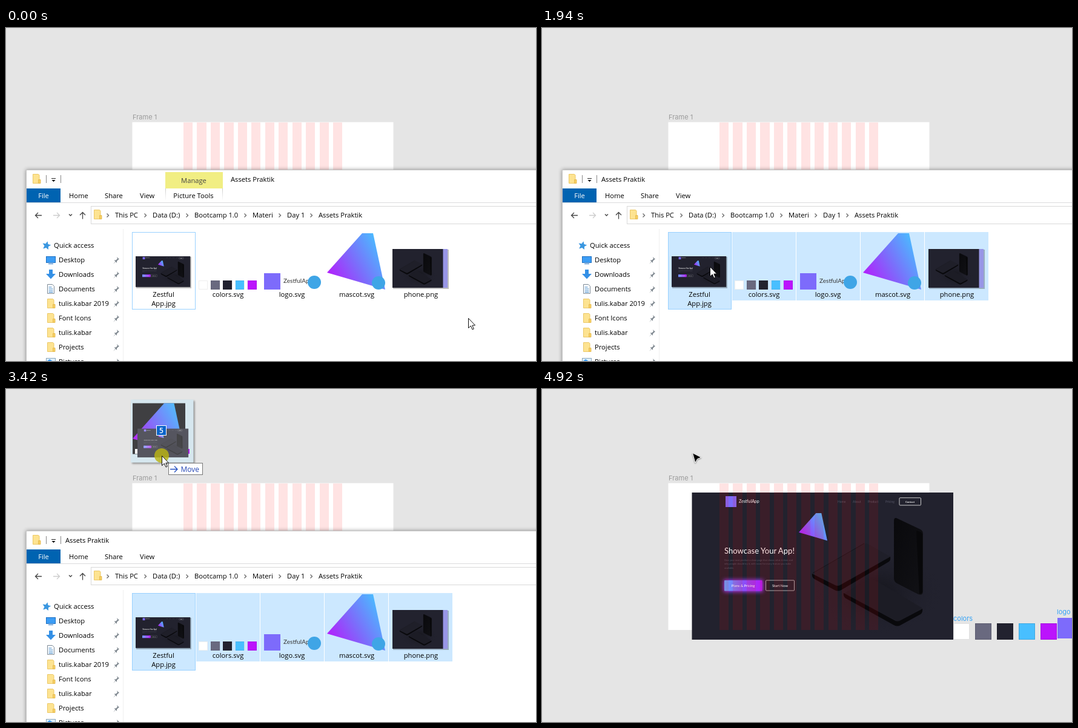
Recreate the animation shown at these times as an HTML page. Size 875x550 px, loop 6240 ms.

```html
<!DOCTYPE html>
<html lang="en">
<head>
<meta charset="utf-8">
<title>Dragging assets into a canvas</title>
<style>
  html, body { margin: 0; width: 100%; height: 100%; overflow: hidden; background: #e5e5e5; }
  svg { display: block; width: 875px; height: 550px; }
  .ui { font: 11.2px "Open Sans", "Noto Sans", sans-serif; fill: #000; }
  .canvas { font: 11px Inter, sans-serif; }
  .page { font: 7px Lato, sans-serif; fill: #fff; }
  .mid { text-anchor: middle; }
  .crisp { shape-rendering: crispEdges; }
  .line { fill: none; stroke: #444; stroke-width: 1.3; }
  #panel { filter: drop-shadow(0 0 3px rgba(0, 0, 0, .4)); }
  #ghostBox { filter: drop-shadow(2px 2px 1.5px rgba(0, 0, 0, .4)); }
  #glow { filter: blur(3px); }
  #pen { filter: drop-shadow(0 1px 1px rgba(0, 0, 0, .45)); }
</style>
</head>
<body>
<svg viewBox="0 0 875 550" xmlns="http://www.w3.org/2000/svg">
  <defs>
    <linearGradient id="tone" x1="0" y1=".85" x2="1" y2=".3">
      <stop offset="0" stop-color="#bb14fc"/><stop offset=".5" stop-color="#7d6bfb"/><stop offset="1" stop-color="#48bfff"/>
    </linearGradient>
    <linearGradient id="cta"><stop offset="0" stop-color="#66a6ff"/><stop offset=".5" stop-color="#8a52f8"/><stop offset="1" stop-color="#b41bf8"/></linearGradient>
    <linearGradient id="edge" x1="0" y1="0" x2="0" y2="1"><stop offset="0" stop-color="#c8c8c8"/><stop offset="1" stop-color="#fff"/></linearGradient>
    <linearGradient id="slab" x1="0" y1="0" x2="1" y2="1"><stop offset="0" stop-color="#09090c"/><stop offset="1" stop-color="#111115"/></linearGradient>
    <radialGradient id="shade"><stop offset="0" stop-color="#15151c"/><stop offset="1" stop-color="#22222e" stop-opacity="0"/></radialGradient>

    <g id="folder">
      <path d="M.5 .5h9l1.500 1.500v13.500h-10.500z" fill="#fde391" stroke="#ecc867"/>
      <path d="M9.500 9.500h3.500v6h-3.500z" fill="#f7cf63" stroke="#e2b548" stroke-width=".8"/>
    </g>
    <path id="pin" d="M4-5l4 4-1.500.5-2.500 2.500v3l-2-2-4 4 3.500-4.500-2-2h3l2.500-2.500z" fill="#7d868e"/>
    <path id="chev" d="M-1.500-3l3 3-3 3" class="line" style="stroke:#666"/>
    <polygon id="mascot" points="588,339 606,339 626,432 530,404" fill="url(#tone)"/>
    <g id="swatches" class="crisp"></g>

    <g id="phones">
      <ellipse cx="555" cy="335" rx="110" ry="72" fill="url(#shade)"/>
      <path d="M447 304L530 256q4-2 8 0L575 277L489 326z" fill="#1f1f29"/>
      <path d="M447 304L532 255" stroke="#15151b" fill="none"/>
      <path d="M446 305q-1 6 4 9l33 18q6 3 11 0L573 285q3-2 2-8L492 324q-4 2-8 0z" fill="#09090c"/>
      <path d="M498 338l46-26 84 50-40 22z" fill="#1c1c25"/>
      <path d="M498 337q-1 6 4 9l79 44q6 3 11 0l33-18q4-3 3-9l-36 19q-5 3-10 0z" fill="#09090c"/>
      <path d="M581 218q0-7 6-4l38 18q4 2 4 7v95q0 8-8 5l-35-18q-5-3-5-8z" fill="url(#slab)"/>
      <path d="M618 234l7 2q3 2 3 6v92q0 5-5 4z" fill="#08080a"/>
    </g>

    <g id="landing" class="page">
      <rect x="247.500" y="171" width="431.500" height="243" fill="#22222e"/>
      <use href="#phones"/>
      <rect x="303" y="177" width="18" height="18" fill="#7d6bfb"/>
      <text x="325" y="187.500">ZestfulApp</text>
      <g id="nav" fill="#555565" font-size="5"></g>
      <rect x="590" y="179.700" width="35.500" height="12.300" rx="1.200" fill="none" stroke="#ddd" stroke-width=".9"/>
      <text x="607.500" y="187.600" class="mid" font-size="4.300" font-weight="700">Contact</text>
      <use href="#mascot" transform="translate(164.300 38.900) scale(.49)"/>
      <text x="301" y="272" font-size="13.100">Showcase Your App!</text>
      <g id="blurb" fill="#575766" font-size="4"></g>
      <rect id="glow" x="300" y="315" width="65" height="20" fill="#9b3cff"/>
      <rect x="301" y="316" width="62.500" height="17.500" rx="1" fill="url(#cta)"/>
      <text x="332" y="326.700" class="mid" font-size="5.900">Plans &amp; Pricing</text>
      <rect x="369.500" y="316" width="47" height="17" rx="1" fill="none" stroke="#ccc" stroke-width=".8"/>
      <text x="393" y="326.700" class="mid" font-size="5.900">Start Now</text>
    </g>
  </defs>

  <rect width="875" height="550" fill="#e5e5e5"/>
  <text class="canvas" x="209" y="151" fill="#9b9b9b">Frame 1</text>
  <rect x="208.500" y="155.500" width="431" height="242.500" fill="#fff"/>
  <use id="dropPage" href="#landing"/>
  <g id="grid" class="crisp" fill="#f00" fill-opacity=".11"></g>
  <g id="dropColors">
    <text class="canvas" x="679" y="383" fill="#36a3f5">colors</text>
    <use href="#swatches" transform="translate(679 387)"/>
  </g>
  <g id="dropLogo">
    <text class="canvas" x="850" y="372" fill="#36a3f5">logo</text>
    <rect x="851" y="378" width="34" height="34" fill="#7d6bfb"/>
  </g>

  <g id="explorer" class="ui">
    <rect id="panel" x="33" y="234" width="900" height="400" fill="#fff"/>
    <path class="crisp" d="M33.500 640V234.500H880" fill="none" stroke="#c4c4c4"/>
    <use href="#folder" x="44" y="241"/>
    <path class="crisp" d="M66.500 243v13M90.500 243v13" stroke="#888"/>
    <path d="M75 248.500h7" stroke="#222"/><path d="M75.500 251h6l-3 3z"/>
    <g id="manage">
      <rect x="263" y="238" width="95" height="27" fill="#f1ee83"/>
      <rect x="263" y="265" width="1" height="20" fill="url(#edge)"/>
      <rect x="357" y="265" width="1" height="20" fill="url(#edge)"/>
      <text x="310" y="256" class="mid" fill="#444">Manage</text>
      <text x="309.500" y="281" class="mid">Picture Tools</text>
    </g>
    <text id="title" y="254">Assets Praktik</text>
    <rect x="34" y="265" width="56" height="23" fill="#0063b1"/>
    <text x="62" y="281" class="mid" fill="#fff">File</text>
    <text x="104" y="281">Home</text><text x="163" y="281">Share</text><text x="221" y="281">View</text>
    <path class="crisp" d="M34 288.500h841" stroke="#dadbdc"/>
    <path class="line" d="M59 309.500H48.500M53 305l-4.500 4.500 4.500 4.500" stroke-width="1.500"/>
    <path class="line" d="M78 309.500h10.500M84 305l4.500 4.500-4.500 4.500" style="stroke:#ccc"/>
    <path class="line" d="M104 307.500l2.500 2.500 2.500-2.500"/>
    <path class="line" d="M126.500 315.500V304.500M122 309l4.500-4.500 4.500 4.500" stroke-width="1.500"/>
    <path class="crisp" d="M880 294.500H140.500v29H880" fill="none" stroke="#d9d9d9"/>
    <use href="#folder" x="145" y="300"/>
    <g id="hot" class="crisp"><rect x="403.500" y="295.500" width="56" height="27" fill="#e5f3ff" stroke="#cce8ff"/><path d="M446.500 296v26" stroke="#cce8ff"/></g>
    <g id="crumbs"></g>
    <path class="crisp" d="M193.500 332V550" stroke="#f0f0f0"/>
    <path d="M67 352l2 4.500 5 .5-3.700 3.300 1 5L67 363l-4.500 2.500 1.200-5L60 357l5-.5z" fill="#3a97e0" transform="rotate(12 67 359)"/>
    <text x="79" y="363">Quick access</text>
    <rect x="66.500" y="377.500" width="15" height="10" fill="#3c9df5" stroke="#1f6fc0"/><path d="M70 389.500h8" stroke="#1f6fc0"/>
    <path d="M71 399h6v7h5l-8 8.500-8-8.500h5z" fill="#3490e6"/>
    <path d="M68.500 423.500h8l3 3v12h-11z" fill="#fff" stroke="#7d8a96"/><path d="M70.500 428h5M70.500 431h7M70.500 434h7M70.500 436.500h7" stroke="#3c86c8"/>
    <rect x="66.500" y="545.500" width="15" height="12" fill="#dff0fd" stroke="#8ba6bb"/><path d="M68 550l4-3 9 6H68z" fill="#3c9df5"/>
    <g id="side"></g>

    <g id="cells" class="crisp"></g>
    <rect class="crisp" x="208.500" y="337.500" width="104" height="127" fill="none" stroke="#99d1ff"/>
    <rect x="215" y="378" width="91" height="52" fill="#000" opacity=".25"/>
    <use href="#landing" transform="translate(162.300 341.300) scale(.209)"/>
    <use href="#swatches" transform="translate(318 417) scale(.56)"/>
    <rect x="426" y="405" width="27" height="27" fill="#7d6bfb"/>
    <text x="458" y="421" style="font:10px Lato,sans-serif" fill="#333">ZestfulApp</text>
    <use href="#mascot"/>
    <circle cx="509" cy="420" r="11" fill="#3fa5e6"/><circle cx="615" cy="421" r="11" fill="#3fa5e6"/>
    <rect x="639" y="366" width="92" height="65" fill="#000" opacity=".25"/>
    <rect x="638" y="365" width="91" height="64" fill="#22222e"/>
    <rect x="721.500" y="365" width="7.500" height="64" fill="#9896e6"/>
    <use href="#phones" transform="translate(520.400 310.200) scale(.29)"/>
    <g id="names" class="mid"></g>
  </g>

  <rect id="band" fill="#0078d7" fill-opacity=".34" stroke="#0078d7" class="crisp"/>
  <g id="pointer">
    <g id="ghost">
      <rect id="ghostBox" x="-51" y="-92.500" width="103.500" height="104" rx="1" fill="#d6e8f0"/>
      <rect x="-48" y="-86.500" width="87" height="84" fill="#37373a"/>
      <use href="#mascot" transform="translate(-525 -391.600) scale(.9)"/>
      <rect x="-44" y="-11" width="5" height="8" fill="#fff"/><rect x="38" y="-11" width="8" height="8" fill="#bb14fc"/>
      <use href="#landing" transform="translate(-88.300 -77.800) scale(.195)"/>
      <rect x="-40" y="-44.500" width="84" height="47.500" fill="#fff" opacity=".2"/>
    </g>
    <g id="badge"><rect x="-8.500" y="-49.500" width="16" height="16" fill="#0a63c9" stroke="#fff"/><text class="ui mid" x="-.5" y="-37" style="fill:#fff;font-weight:600;font-size:12px">5</text></g>
    <circle id="press" r="12" fill="#bbb414" fill-opacity=".82"/>
    <polygon id="arrow" points=".5,.5 .5,16.500 4.300,13 7,19 9.300,18 6.800,12.200 11.500,12" fill="#fff" stroke="#111"/>
    <g id="tip">
      <rect class="crisp" x="11.500" y="12.500" width="56" height="19" fill="#fff" stroke="#777"/>
      <path d="M14 22.500h12M21 17.500l5 5-5 5" fill="none" stroke="#2450c0" stroke-width="1.300"/>
      <text class="ui" x="31.500" y="26.500" style="fill:#2546b4;font-size:12px">Move</text>
    </g>
    <path id="pen" d="M.5 .5L15 8l-6.500 2.500L5 17z" fill="#000" stroke="#fff"/>
  </g>
</svg>

<script>
const LOOP = 6240;
const $ = id => document.getElementById(id);
const fill = (id, list, make) => { $(id).innerHTML = list.map(make).join(""); };
const text = (x, y, s) => `<text x="${x}" y="${y}">${s}</text>`;

fill("grid", [...Array(12).keys()], i =>
  `<rect x="${293 + i * 22.45}" y="155.5" width="15.2" height="242.5"/>`);
fill("swatches", ["#fff", "#69697f", "#22222f", "#48bfff", "#bb14fc"], (c, i) =>
  `<rect x="${i * 36.1}" width="26.5" height="26.5" fill="${c}" stroke="#000" stroke-opacity=".12"/>`);
fill("nav", [["Home", 488], ["About", 513], ["Product", 538], ["Pricing", 567]], ([s, x]) => text(x, 187.5, s));
fill("blurb", [
  "Give your next product a clean page that shows what it does and",
  "why people should try it, with room for every feature you make",
  "available."
], (s, i) => text(301, 283.5 + i * 6.7, s));
fill("crumbs", [["This PC", 180], ["Data (D:)", 242], ["Bootcamp 1.0", 311], ["Materi", 407], ["Day 1", 464], ["Assets Praktik", 516]],
  ([s, x]) => `<use href="#chev" x="${x - 12}" y="309.5"/>` + text(x, 313, s));
fill("side", ["Desktop", "Downloads", "Documents", "tulis.kabar 2019", "Font Icons", "tulis.kabar", "Projects", "Pictures"], (s, i) => {
  const y = 387 + i * 24;
  return text(87, y, s) + `<use href="#pin" x="179" y="${y - 4}"/>` +
    (i > 2 && i < 7 ? `<use href="#folder" x="68" y="${y - 12}"/>` : "");
});
fill("names", [["Zestful", 260, 444], ["App.jpg", 260, 459], ["colors.svg", 366.5, 444], ["logo.svg", 472, 444], ["mascot.svg", 579, 444], ["phone.png", 685, 444]],
  ([s, x, y]) => text(x, y, s));

const cells = [0, 1, 2, 3, 4].map(i => ({ x: 208 + i * 106, w: 105, h: i ? 113 : 128 }));
fill("cells", cells, c => `<rect x="${c.x}" y="337" width="${c.w}" height="${c.h}" fill="#cce8ff"/>`);
const cellNodes = [...$("cells").children];

// Pointer steps: time, x, y
const path = [
  [0, 763, 479], [70, 763, 487], [140, 764, 495],
  [390, 764, 495], [470, 750, 489], [550, 700, 478], [620, 625, 460], [700, 535, 442], [780, 445, 425],
  [850, 365, 412], [930, 305, 404], [1000, 265, 398], [1070, 245, 395], [1160, 237, 394],
  [1790, 246, 391], [1860, 263, 389], [1940, 277, 394],
  [2420, 284, 389], [2500, 318, 362], [2570, 355, 335], [2650, 396, 305], [2720, 404, 277], [2800, 392, 235], [2870, 370, 196],
  [2990, 352, 177], [3040, 326, 156], [3110, 304, 138], [3190, 286, 127], [3270, 274, 120], [3350, 264, 114], [3420, 257, 110], [3500, 253, 108],
  [3670, 252, 107], [3740, 250, 106], [3820, 249, 105], [3890, 248, 105]
];
const start = { x: 765, y: 496 };
const show = (node, on) => node.setAttribute("visibility", on ? "visible" : "hidden");
const during = (t, a, b) => t >= a && t < b;

// id: visible from, until
const spans = {
  manage: [0, 390], band: [390, 1540], hot: [2650, 2800], explorer: [0, 4140],
  ghost: [2500, 4140], badge: [2500, 4140], tip: [2870, 4140], arrow: [0, 4140], pen: [4140, LOOP],
  dropPage: [4750, LOOP], dropColors: [4830, LOOP], dropLogo: [4920, LOOP]
};

function render(t) {
  const [, x, y] = path.findLast(p => p[0] <= t);
  for (const id in spans) $(id).style.display = during(t, ...spans[id]) ? "" : "none";
  show($("press"), during(t, 390, 1540) || during(t, 2340, 4140));
  $("title").setAttribute("x", t < 390 ? 371 : 98);
  $("pointer").setAttribute("transform", `translate(${x} ${y})`);
  $("ghost").setAttribute("opacity", t < 2870 ? .84 : .95);

  const box = { x: x + .5, y: y + .5, width: Math.max(0, start.x - x - 1), height: Math.max(0, start.y - y - 1) };
  for (const k in box) $("band").setAttribute(k, box[k]);
  cells.forEach((c, i) => {
    const hit = x < c.x + c.w && y < 337 + c.h;
    cellNodes[i].style.display = t >= 1540 || (t >= 390 && hit) ? "" : "none";
  });
}

const t0 = performance.now();
function tick() {
  render((performance.now() - t0) % LOOP);
  requestAnimationFrame(tick);
}
tick();
</script>
</body>
</html>
```
